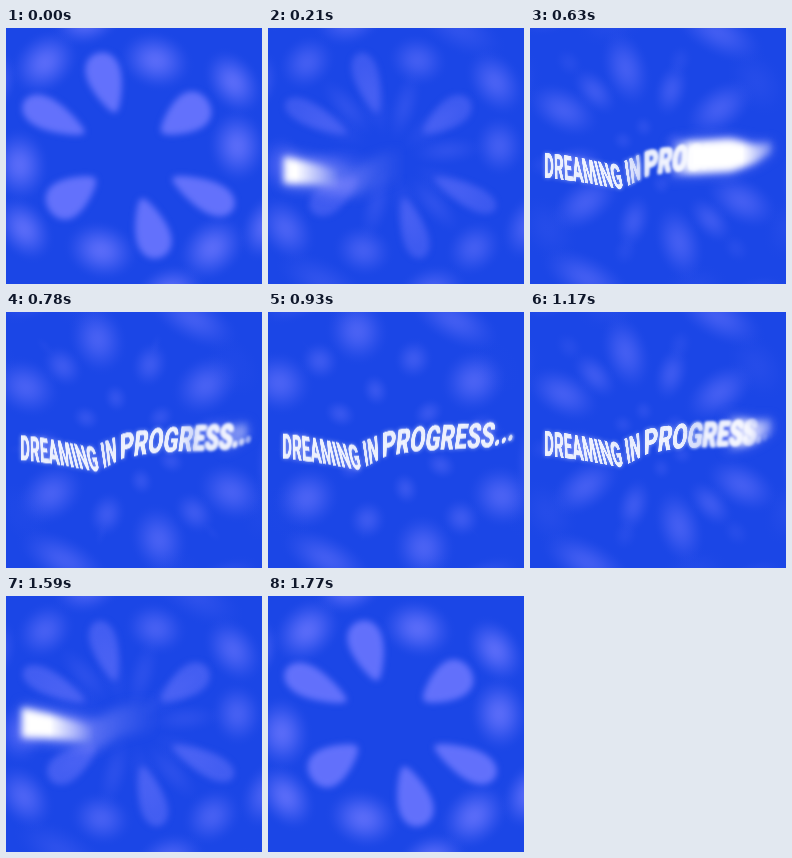
Animation, 256 px wide and 256 px high, one loop 1800 ms. Source, as an HTML page with a canvas:

```html
<!DOCTYPE html>
<html lang="en">
<head>
<meta charset="utf-8">
<title>Dreaming in progress</title>
<style>
html, body { margin: 0; width: 100%; height: 100%; overflow: hidden; background: #1b46e6; }
canvas { display: block; width: 100vw; height: 100vh; }
</style>
</head>
<body>
<canvas id="stage" width="256" height="256"></canvas>
<script>
const SIZE = 256, LOOP = 1800, STEP = 30;
const BASE = '#1b46e6', LIGHT = '112,121,255';
const TEXT = 'DREAMING IN PROGRESS...';
const CX = 122.5, CY = 127.5, LEFT = 14, RIGHT = 247;

const layer = () => {
  const c = document.createElement('canvas');
  c.width = c.height = SIZE;
  return c.getContext('2d');
};
const ctx = document.getElementById('stage').getContext('2d');
const words = layer(), mask = layer();

const clamp = v => Math.max(0, Math.min(1, v));
const mix = (a, b, k) => a + (b - a) * k;
const ramp = (a, b, x) => clamp((x - a) / (b - a));
const smooth = k => k * k * (3 - 2 * k);

// piecewise line through [x, y] points
function curve(pts, x) {
  if (x <= pts[0][0]) return pts[0][1];
  for (let i = 1; i < pts.length; i++) {
    const [x0, y0] = pts[i - 1], [x1, y1] = pts[i];
    if (x <= x1) return mix(y0, y1, (x - x0) / (x1 - x0));
  }
  return pts[pts.length - 1][1];
}

// Spokes: [angle in degrees, scale]. Each also appears half a turn away.
const SPOKES = [[-107, 1], [-153, 1.1], [-35, .9]];
const GAPS = [[-132, 1.2], [-74, .95], [-5, 1.05]];

// Runs from 0 (petals) through 1 (star) to 3 (scattered clouds) and back.
function bloom(t) {
  const p = curve([[0, 0], [390, 1], [630, 2], [900, 3], [1170, 2], [1380, 1], [1785, 0]], t);
  return p < 1 ? smooth(p) : p;
}

function ring(spokes, r, draw, twist = 0) {
  for (const [deg, s] of spokes) {
    for (const turn of [0, 180]) {
      ctx.save();
      ctx.translate(CX, CY);
      ctx.rotate((deg + turn + twist) * Math.PI / 180);
      ctx.translate(r * s, 0);
      draw(s);
      ctx.restore();
    }
  }
}

function clouds(spokes, r, len, wid, a, twist) {
  if (a < .01) return;
  const g = ctx.createRadialGradient(0, 0, 0, 0, 0, 1);
  for (let i = 0; i <= 10; i++)
    g.addColorStop(i / 10, `rgba(${LIGHT},${a * (1 - smooth(i / 10))})`);
  ctx.fillStyle = g;
  ring(spokes, r, () => {
    ctx.scale(len * 1.15, wid * 1.15);
    ctx.fillRect(-1, -1, 2, 2);
  }, twist);
}

function petals(k) {
  ctx.filter = 'blur(3px)';
  ctx.fillStyle = `rgba(${LIGHT},${.85 * (1 - k)})`;
  ring(SPOKES, 76, s => {
    ctx.scale(31 * s, 20 / s * (1 - k * .45));
    ctx.beginPath();
    for (let i = 0; i < 60; i++) {
      const a = i / 30 * Math.PI;
      ctx.lineTo(Math.cos(a), Math.sin(a) * (.8 + .35 * Math.cos(a)));
    }
    ctx.fill();
  });
  ctx.filter = 'none';
}

function background(t) {
  const p = bloom(t), q = Math.max(0, p - 1);
  ctx.fillStyle = BASE;
  ctx.fillRect(0, 0, SIZE, SIZE);
  if (p < 1) petals(p);
  const shown = clamp(p);
  clouds(SPOKES, 66 + 25 * q, 42 - 6 * q, 15 + 7 * q, shown * (.38 + .09 * q));
  clouds(SPOKES, 6 + 24 * q, 6 + 5 * q, 7 + 3 * q, .17 * q);
  clouds(GAPS, 54 + 18 * q, 34 - 8 * q, 14 + 2 * q, shown * .38);
  clouds(GAPS, 104, 27 - 6 * p, 34 - 11 * p, curve([[0, .72], [1, .25], [3, 0]], p));
  clouds(SPOKES, 142, 24, 33, curve([[0, .72], [1, .4], [1.3, .2], [3, 0]], p));
  clouds(GAPS, 152 - 5 * q, 22, 46, shown * .45, 12);
}

// Lettering: tight on the falling side of the wave, wide on the rising side.
const WAVE = [[14, 134], [45, 138], [88, 146], [118, 132], [150, 127], [225, 123], [247, 115]];
const waveY = x => (curve(WAVE, x - 3) + curve(WAVE, x) + curve(WAVE, x + 3)) / 3;
const spread = x => x < 116 ? (x - LEFT) / 192 : .53 + (x - 116) / 279;
const lean = x => .27 * Math.exp(-(((x - 75) / 28) ** 2)) - .13 * ramp(105, 135, x);

const FONT = '800 70px Roboto, "Liberation Sans", sans-serif';
const plate = document.createElement('canvas').getContext('2d');
plate.font = FONT;
const plateW = Math.ceil(plate.measureText(TEXT).width);
plate.canvas.width = plateW;
plate.canvas.height = 70;
plate.font = FONT;
plate.fillStyle = '#fff';
plate.fillText(TEXT, 0, 60);

function bend() {
  const step = .5;
  for (let x = LEFT; x < RIGHT; x += step) {
    const u = spread(x) * plateW, v = spread(x + step) * plateW;
    words.setTransform(1, 0, lean(x), 1, x, waveY(x));
    words.drawImage(plate.canvas, u, 0, v - u, 70, 0, -17.5, step + .2, 35);
  }
}
bend();

// Where sharp lettering turns into smoke.
const edgeAt = t => curve([[0, -230], [420, 6], [630, 105], [900, 245], [1000, 245],
  [1170, 162], [1380, 60], [1770, -230]], t);

// Paints through a horizontal opacity ramp given by alpha(x).
function veiled(alpha, dy, paint) {
  mask.globalCompositeOperation = 'source-over';
  mask.clearRect(0, 0, SIZE, SIZE);
  mask.save();
  mask.translate(0, dy);
  paint(mask);
  mask.restore();
  const g = mask.createLinearGradient(0, 0, SIZE, 0);
  for (let x = 0; x <= SIZE; x += 4)
    g.addColorStop(x / SIZE, `rgba(0,0,0,${clamp(alpha(x))})`);
  mask.globalCompositeOperation = 'destination-in';
  mask.fillStyle = g;
  mask.fillRect(0, 0, SIZE, SIZE);
  ctx.drawImage(mask.canvas, 0, 0);
}

const soft = (blur, times = 1) => c => {
  c.filter = `blur(${blur}px)`;
  for (let i = 0; i < times; i++) c.drawImage(words.canvas, 0, 0);
  c.filter = 'none';
};

const smoke = (edge, thick, thin, blur, color) => c => {
  const top = [], low = [];
  for (let x = Math.max(16, edge + 30); x <= 244; x += 3) {
    const h = mix(thick, thin, ramp(100, 190, x - edge)) * mix(1, .35, ramp(200, 246, x));
    top.push([x, waveY(x) - h]);
    low.unshift([x, waveY(x) + h]);
  }
  if (!top.length) return;
  c.filter = `blur(${blur}px)`;
  c.fillStyle = color;
  c.beginPath();
  [...top, ...low].forEach(([x, y]) => c.lineTo(x, y));
  c.fill();
  c.filter = 'none';
};

function lettering(t) {
  const edge = edgeAt(t), dy = (900 - t) / 90;
  if (edge < -225) return;
  const band = (a, b, c, d) => x =>
    ramp(edge + a, edge + b, x) * (1 - ramp(edge + c, edge + d, x));
  const white = band(36, 56, 140, 185), haze = band(20, 60, 165, 250), blurred = band(-10, 12, 45, 80);

  veiled(x => .6 * haze(x) * mix(1, .5, ramp(215, 248, x)), dy,
    smoke(edge, 19, 15, 6, '#9a9aff'));
  veiled(x => white(x) * mix(1, .15, ramp(212, 244, x)), dy,
    smoke(edge, 16, 7, 3.5, '#fff'));
  veiled(x => .55 * (1 - ramp(edge + 45, edge + 70, x)), dy, soft(2));
  veiled(x => .9 * blurred(x), dy, soft(1.8, 2));
  veiled(x => 1 - ramp(edge - 8, edge + 16, x), dy, soft(.4));
}

const start = performance.now();
function tick() {
  const now = performance.now() - start;
  const t = Math.floor((now % LOOP) / STEP) * STEP;
  background(t);
  lettering(t);
  requestAnimationFrame(tick);
}
tick();
</script>
</body>
</html>
```
